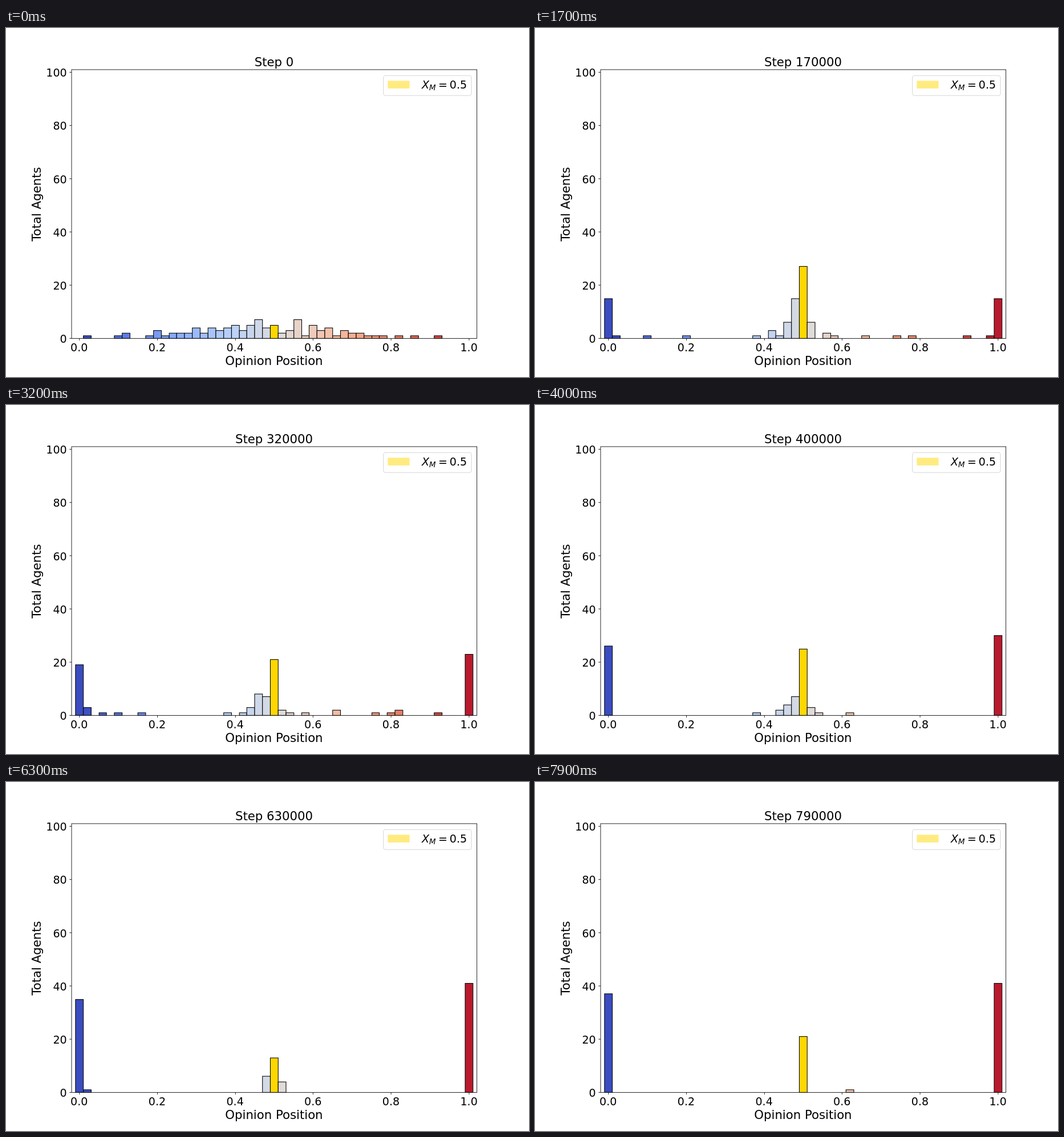
An HTML page with a canvas for the animation above (8 s loop, 917 by 611 pixels).

```html
<!DOCTYPE html>
<html lang="en">
<head>
<meta charset="utf-8">
<title>Opinion histogram</title>
<style>
  html, body { margin: 0; width: 100%; height: 100%; overflow: hidden; background: #fff; }
  canvas, svg { position: absolute; left: 0; top: 0; width: 917px; height: 611px; display: block; }
  text { font-family: "DejaVu Sans", Verdana, sans-serif; fill: #000; white-space: pre; }
</style>
</head>
<body>
<canvas id="plot" width="917" height="611"></canvas>
<svg id="labels" viewBox="0 0 1200 800" preserveAspectRatio="none"></svg>
<script>
const ctx = document.getElementById('plot').getContext('2d');
const svg = document.getElementById('labels');

// The figure is laid out at 1200 x 800 and scaled down to the stage.
const W = 1200, H = 800, PT = 100 / 72;
const LEFT = 150, RIGHT = 1080, TOP = 96, BOTTOM = 712;
const BIN = (RIGHT - LEFT) / 52, X0 = LEFT + BIN, UNIT = (BOTTOM - TOP) / 101;
const SMALL = 18 * PT, LARGE = 20 * PT, MID = (LEFT + RIGHT) / 2;
const AGENTS = 100, LAST = 50, CENTRE = 25, LONER = 6;
const STEP_MS = 100, STEPS = 80;

const snapX = x => Math.round(x) + 0.5;
const snapY = y => Math.round(y) - 0.5;
const binX = bin => X0 + bin * BIN;
const countY = n => BOTTOM - n * UNIT;
const clamp = (v, lo, hi) => Math.min(hi, Math.max(lo, v));
const lerp = (a, b, u) => a + (b - a) * u;

function rand(a, b) {
  let h = Math.imul(a + 1, 374761393) ^ Math.imul(b + 1, 668265263);
  h = Math.imul(h ^ (h >>> 13), 1274126177);
  h = Math.imul(h ^ (h >>> 16), 2246822519);
  return ((h ^ (h >>> 15)) >>> 0) / 4294967296;
}

// Start: roughly normal opinions, a little uneven.
function normalCrowd() {
  return Array.from({ length: AGENTS }, (_, i) => {
    const p = (i + 0.5) / AGENTS;
    const z = 4.91 * (p ** 0.14 - (1 - p) ** 0.14);
    return clamp(Math.round(23.3 + 8.8 * z + 2 * rand(i, 7) - 1), 1, 46);
  });
}

// Later: two extremes and a middle cluster whose flanks thin out by a fixed share;
// the last agent of a flank stands alone, and the rest wait beside the extremes.
function splitCrowd(at, low, left, gold, right, high) {
  const list = [];
  const add = (bin, n) => { while (n-- > 0) list.push(bin); };
  const share = 0.5 + 0.5 * Math.min(1, at / 63) ** 8;
  const flank = (n, side) => {
    for (let d = 1; n > 0; d++) {
      const part = Math.round(n * share);
      add(CENTRE + side * (n === 1 ? LONER : d), part);
      n -= part;
    }
  };
  add(0, low);
  flank(left, -1);
  add(CENTRE, gold);
  flank(right, 1);
  add(LAST, high);
  const waiting = AGENTS - list.length;
  add(1, Math.ceil(waiting / 2));
  add(LAST - 1, Math.floor(waiting / 2));
  return list;
}

const split = (at, ...counts) => ({ at, agents: splitCrowd(at, ...counts) });
const keys = [
  { at: 0, agents: normalCrowd() },
  split(11, 15, 14, 48, 8, 14),
  split(23, 18, 36, 15, 7, 21),
  split(40, 26, 14, 25, 5, 30),
  split(52, 27, 15, 10, 6, 34),
  split(63, 35, 6, 13, 4, 41),
  split(79, 37, 0, 21, 1, 41)
];
keys.forEach(k => k.agents.sort((a, b) => a - b));

// Each agent drifts to its next place in its own time window, with random moves on the way.
function histogram(step) {
  const counts = new Array(LAST + 1).fill(0);
  let k = 0;
  while (k < keys.length - 2 && step >= keys[k + 1].at) k++;
  const a = keys[k], b = keys[k + 1];
  const t = (step - a.at) / (b.at - a.at);
  for (let i = 0; i < AGENTS; i++) {
    const u = clamp((t - rand(i, k) * 0.5) / 0.5, 0, 1);
    let pos = Math.round(lerp(a.agents[i], b.agents[i], u * u * (3 - 2 * u)));
    if (t > 0 && t < 1 && pos > 10 && pos < 40)
      pos += Math.round(5 * (2 * rand(i + 200, step) - 1) ** 11);
    counts[pos]++;
  }
  return counts;
}

// Diverging blue-grey-red scale
const scale = ['3b4cc0', '6282ea', '8db0fe', 'b8d0f9', 'dddddd', 'f5c4ad', 'f49a7b', 'de604d', 'b6142a']
  .map(hex => [0, 2, 4].map(i => parseInt(hex.slice(i, i + 2), 16)));

function barColor(bin) {
  if (bin === CENTRE) return '#ffd700';
  const v = clamp((bin - 0.5) / LAST, 0, 1) * (scale.length - 1);
  const i = Math.floor(v);
  return `rgb(${scale[i].map((c, n) => Math.round(lerp(c, scale[i + 1][n], v - i)))})`;
}

function line(x1, y1, x2, y2) {
  ctx.beginPath();
  ctx.moveTo(x1, y1);
  ctx.lineTo(x2, y2);
  ctx.stroke();
}

function drawBars(step) {
  ctx.save();
  ctx.beginPath();
  ctx.rect(LEFT, TOP, RIGHT - LEFT, BOTTOM - TOP);
  ctx.clip();
  ctx.strokeStyle = '#000';
  ctx.lineWidth = PT;
  histogram(step).forEach((n, bin) => {
    if (!n) return;
    const x = snapX(binX(bin - 0.5)), y = snapY(countY(n));
    const box = [x, y, snapX(binX(bin + 0.5)) - x, snapY(BOTTOM) - y];
    ctx.fillStyle = barColor(bin);
    ctx.fillRect(...box);
    ctx.strokeRect(...box);
  });
  ctx.restore();
}

function drawFrame() {
  const x0 = snapX(LEFT), y0 = snapY(BOTTOM), tick = 3.5 * PT;
  ctx.strokeStyle = '#000';
  ctx.lineWidth = 0.8 * PT;
  ctx.strokeRect(x0, snapY(TOP), snapX(RIGHT) - x0, y0 - snapY(TOP));
  for (let i = 0; i <= 5; i++) {
    const x = snapX(binX(i * 10)), y = snapY(countY(i * 20));
    line(x, y0, x, y0 + tick);
    line(x0 - tick, y, x0, y);
  }
  ctx.beginPath();
  ctx.roundRect(866, 109, 202, 45.8, 5);
  ctx.fillStyle = '#fff';
  ctx.fill();
  ctx.strokeStyle = '#d6d6d6';
  ctx.lineWidth = PT;
  ctx.stroke();
  ctx.fillStyle = 'rgba(255, 215, 0, 0.5)';
  ctx.fillRect(876, 121, 50, 17.5);
}

function label(str, x, y, size, anchor, extra = {}) {
  const el = document.createElementNS('http://www.w3.org/2000/svg', 'text');
  const attrs = { x, y, 'font-size': size, 'text-anchor': anchor, ...extra };
  for (const name in attrs) el.setAttribute(name, attrs[name]);
  el.textContent = str;
  svg.append(el);
  return el;
}

const title = label('Step 0', MID, 87.7, LARGE, 'middle');
label('Opinion Position', MID, 772.8, LARGE, 'middle');
label('Total Agents', 0, 0, LARGE, 'middle', { transform: 'translate(79.8 404) rotate(-90)' });
for (let i = 0; i <= 5; i++) {
  label((i / 5).toFixed(1), binX(i * 10), 741, SMALL, 'middle');
  label(i * 20, 139.7, countY(i * 20) + 9.5, SMALL, 'end');
}
const italic = { 'font-style': 'italic' };
label('X', 954, 138.8, SMALL, 'start', italic);
label('M', 971, 142.9, SMALL * 0.7, 'start', italic);
label('=', 992, 138.8, SMALL, 'start');
label('0.5', 1017.8, 138.8, SMALL, 'start');

let shown = -1;
const begin = performance.now();
ctx.scale(917 / W, 611 / H);

function render(now) {
  const step = Math.floor(Math.max(0, now - begin) / STEP_MS) % STEPS;
  if (step !== shown) {
    shown = step;
    ctx.clearRect(0, 0, W, H);
    drawBars(step);
    drawFrame();
    title.textContent = 'Step ' + step * 10000;
  }
  requestAnimationFrame(render);
}
render(begin);
</script>
</body>
</html>
```
